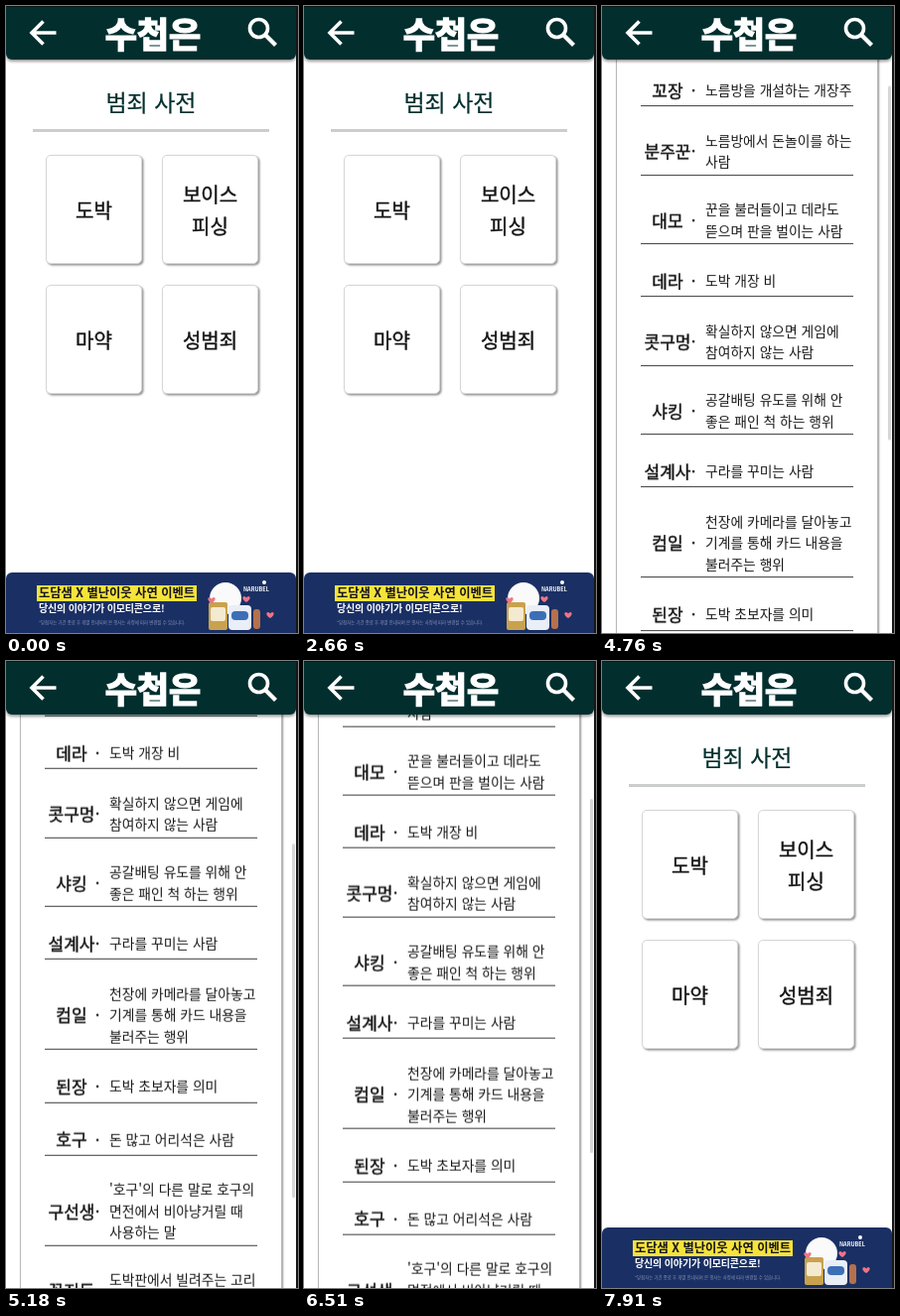
Animation of 294x632 px, one loop 8 s. Source, as an HTML page:

```html
<!DOCTYPE html>
<html lang="ko">
<head>
<meta charset="utf-8">
<title>범죄 사전</title>
<style>
  html, body { margin: 0; width: 100%; height: 100%; overflow: hidden; background: #fff; }
  body { position: relative; font-family: "Noto Sans CJK KR", "Noto Sans CJK", "Noto Sans", sans-serif; color: #161616; }
  #stage { position: absolute; left: 0; top: 0; width: 294px; height: 632px; overflow: hidden; background: #fff; }
  #stage div, #stage svg { position: absolute; box-sizing: border-box; white-space: nowrap; }
  .page { inset: 0; background: #fff; }
  .center { left: 0; width: 292px; text-align: center; }
  .rule { left: 27px; width: 238px; height: 3px; background: #cbcdcd; }
  .medium { -webkit-text-stroke: .45px currentColor; }

  /* top bar */
  .bar { left: 0; top: 0; width: 292px; height: 54px; background: #022e2e; border-top: 1px solid #0b1716;
         border-radius: 0 0 6px 6px; box-shadow: 0 2px 3px rgba(0,0,0,.4); }
  .brand { left: 98px; top: 0; width: 100px; line-height: 52px; text-align: center; color: #fff;
           font-size: 35px; font-weight: 900; -webkit-text-stroke: 1.6px #fff; }
  .edge { left: 292px; top: 0; width: 2px; height: 632px; background: #161616; }

  /* home */
  .heading { top: 76px; line-height: 40px; font-size: 23px; color: #022f2c; -webkit-text-stroke: .2px currentColor; }
  .tile { width: 97px; height: 110px; display: flex; align-items: center; justify-content: center; padding-top: 1px;
          text-align: center; font-size: 20px; line-height: 32px; background: #fff; border: 1px solid #d6d6d6;
          border-radius: 5px; box-shadow: 1.5px 1.5px 2px rgba(0,0,0,.42); }
  .ad { left: 0; top: 571px; width: 292px; height: 61px; background: #1a3064; border-radius: 6px 6px 0 0; overflow: hidden; }
  .ad-title { left: 31px; top: 13px; width: 161px; height: 16px; line-height: 14px; background: #f6e33a; color: #15151f;
              text-align: center; font-size: 12.3px; font-weight: 700; }
  .ad-line { left: 33px; top: 28px; line-height: 16px; font-size: 10px; font-weight: 700; letter-spacing: -.15px; color: #fff; }
  .ad-note { left: 33px; top: 47px; line-height: 7px; font-size: 4.4px; color: #8791b4; }

  /* word list */
  #detail { opacity: 0; animation: show 8s linear infinite; }
  #sheet { left: 0; top: 0; width: 294px; height: 1031px; animation: scroll 8s linear infinite; }
  .panel { left: 14px; top: 62px; width: 264px; height: 941px; background: #fff; border: 1px solid #b9b9b9;
           border-radius: 10px; box-shadow: 1px 1px 2px rgba(0,0,0,.4); }
  .word { top: 79px; line-height: 42px; font-size: 28.5px; color: #022f2c; }
  .hint { top: 123px; line-height: 20px; font-size: 11.5px; color: #868686; }
  #list { left: 39px; top: 193.3px; width: 214px; }
  #stage .row { position: relative; display: flex; align-items: center; box-sizing: content-box; min-height: 27.1px;
         padding-bottom: 1.8px; margin-bottom: 23.4px; border-bottom: 1px solid #3a3a3a; }
  #stage .row div { position: relative; }
  .term { width: 54px; text-align: center; font-size: 17px; line-height: 26px; }
  .dot { left: -7px; width: 12px; text-align: center; font-size: 15px; line-height: 21.6px;
         -webkit-text-stroke: .6px currentColor; }
  .meaning { left: -1px; font-size: 13.8px; line-height: 21.6px; }
  #thumb { left: 288px; top: 12px; width: 3px; height: 357px; border-radius: 2px; background: rgba(200,200,200,.75);
           opacity: 0; animation: thumb 8s linear infinite, thumb-fade 8s linear infinite; }

  @keyframes show {
    0%, 34.6% { opacity: 0; }
    38.3%, 93.2% { opacity: 1; }
    98.5%, 100% { opacity: 0; }
  }
  @keyframes scroll {
    0%, 54.25% { transform: translateY(0); animation-timing-function: cubic-bezier(.4,.1,.7,.75); }
    64.75% { transform: translateY(-306px); animation-timing-function: cubic-bezier(.3,.5,.5,1); }
    71.25%, 79.2% { transform: translateY(-399px); animation-timing-function: cubic-bezier(.35,.2,.4,.98); }
    85.75% { transform: translateY(-6px); animation-timing-function: ease-out; }
    88.25%, 100% { transform: translateY(0); }
  }
  @keyframes thumb {
    0%, 54.25% { transform: translateY(0); animation-timing-function: cubic-bezier(.4,.1,.7,.75); }
    64.75% { transform: translateY(172px); animation-timing-function: cubic-bezier(.3,.5,.5,1); }
    71.25%, 79.2% { transform: translateY(224px); animation-timing-function: cubic-bezier(.35,.2,.4,.98); }
    85.75% { transform: translateY(3px); animation-timing-function: ease-out; }
    88.25%, 100% { transform: translateY(0); }
  }
  @keyframes thumb-fade {
    0%, 54% { opacity: 0; }
    54.2%, 73.5% { opacity: 1; }
    77.8%, 79.2% { opacity: 0; }
    79.6%, 87.6% { opacity: 1; }
    89.25%, 100% { opacity: 0; }
  }
</style>
</head>
<body>
<div id="stage">
  <div class="page">
    <div class="center heading">범죄 사전</div>
    <div class="rule" style="top:124px"></div>
    <div class="tile medium" style="left:40px;top:150px">도박</div>
    <div class="tile medium" style="left:157px;top:150px">보이스<br>피싱</div>
    <div class="tile medium" style="left:40px;top:281px">마약</div>
    <div class="tile medium" style="left:157px;top:281px">성범죄</div>
    <div class="ad">
      <div class="ad-title">도담샘 X 별난이웃 사연 이벤트</div>
      <div class="ad-line">당신의 이야기가 이모티콘으로!</div>
      <div class="ad-note">*당첨자는 기간 종료 후 개별 안내되며 본 행사는 사정에 따라 변경될 수 있습니다.</div>
      <svg width="292" height="61" style="left:0;top:0">
        <ellipse cx="221" cy="26" rx="16" ry="16" fill="#fafafa"/>
        <rect x="204" y="30" width="19" height="28" rx="2" fill="#c9a24e"/>
        <rect x="206" y="35" width="15" height="14" rx="2" fill="#f4ead0"/>
        <rect x="224" y="33" width="23" height="25" rx="4" fill="#e9eef7"/>
        <rect x="227" y="39" width="17" height="9" rx="4" fill="#3c6fb5"/>
        <rect x="249" y="37" width="7" height="20" rx="3" fill="#b5714c"/>
        <g fill="#ee7587">
          <path id="heart" d="M207 31c-5-3-4-6-2-6q1 0 2 1.500q1-1.500 2-1.500c2 0 3 3-2 6z"/>
          <use href="#heart" x="35" y="-1"/>
          <use href="#heart" x="59" y="15"/>
        </g>
        <circle cx="260" cy="10" r="2" fill="#fff"/>
        <text x="239" y="19" font-size="5.500" font-weight="700" fill="#fff">NARUBEL</text>
      </svg>
    </div>
  </div>

  <div class="page" id="detail">
    <div id="sheet">
      <div class="panel"></div>
      <div class="center word">도박</div>
      <div class="center hint">단어 클릭 시 해당 단어 페이지로 이동합니다.</div>
      <div class="rule" style="top:154px"></div>
      <div id="list"></div>
    </div>
  </div>

  <div class="bar">
    <div class="brand">수첩은</div>
    <svg width="292" height="54" style="left:0;top:-1px" fill="none" stroke="#fff" stroke-width="3.600">
      <path d="M50.500 27H26.500M37.500 15.500L26 27L37.500 38.500"/>
      <circle cx="254.500" cy="22.500" r="9"/>
      <path d="M261 29L271.500 39.500" stroke-width="4.300"/>
    </svg>
  </div>
  <div id="thumb"></div>
  <div class="edge"></div>
</div>
<script>
  const words = [
    ["꼬장", "노름방을 개설하는 개장주"],
    ["분주꾼", "노름방에서 돈놀이를 하는|사람"],
    ["대모", "꾼을 불러들이고 데라도|뜯으며 판을 벌이는 사람"],
    ["데라", "도박 개장 비"],
    ["콧구멍", "확실하지 않으면 게임에|참여하지 않는 사람"],
    ["샤킹", "공갈배팅 유도를 위해 안|좋은 패인 척 하는 행위"],
    ["설계사", "구라를 꾸미는 사람"],
    ["컴일", "천장에 카메라를 달아놓고|기계를 통해 카드 내용을|불러주는 행위"],
    ["된장", "도박 초보자를 의미"],
    ["호구", "돈 많고 어리석은 사람"],
    ["구선생", "'호구'의 다른 말로 호구의|면전에서 비아냥거릴 때|사용하는 말"],
    ["꽁짓돈", "도박판에서 빌려주는 고리|대금"]
  ];
  document.getElementById("list").innerHTML = words.map(([term, meaning]) =>
    `<div class="row"><div class="term medium">${term}</div><div class="dot">·</div>` +
    `<div class="meaning">${meaning.replaceAll("|", "<br>")}</div></div>`).join("");
</script>
</body>
</html>
```
